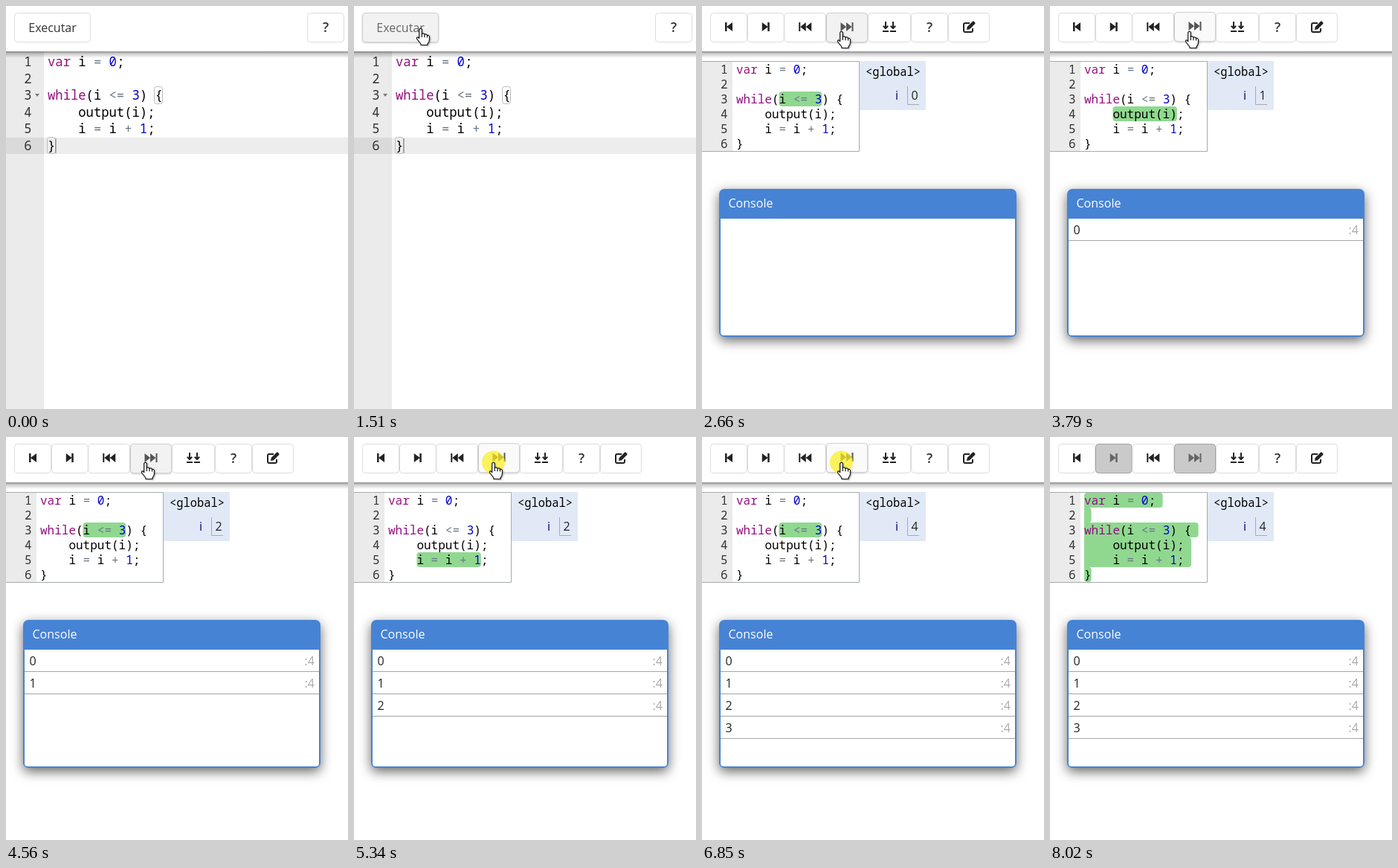
Animation of 460x542 px, one loop 8410 ms. Source, as an HTML page:

```html
<!DOCTYPE html>
<html lang="pt">
<head>
<meta charset="utf-8">
<title>Step debugger</title>
<style>
html, body { margin: 0; width: 100%; height: 100%; overflow: hidden; background: #fff; }
svg { display: block; width: 460px; height: 542px; }
text { font: 16px "Open Sans", "Noto Sans", sans-serif; fill: #222; white-space: pre; }
.big text { font: 17.2px "Noto Sans Mono", monospace; fill: #000; }
.small text { font: 16px "Noto Sans Mono", monospace; fill: #000; }
.big .num, .small .num { fill: #333; text-anchor: end; }
.kw { fill: #930f80; }
.lit { fill: #0000cd; }
.op { fill: #687687; }
.btn rect { fill: #fff; stroke: #dcdcdc; }
.btn text { fill: #333; font-weight: 500; text-anchor: middle; }
.btn path { fill: #222; }
.btn path.line { fill: none; stroke: #222; stroke-width: 2; }
.btn.hover rect { fill: #f2f2f2; stroke: #cfcfcf; filter: drop-shadow(0 1px 1px rgba(0,0,0,.2)); }
.btn.press rect { fill: #fafafa; }
.btn.hover path { fill: #555; }
.btn.hover path.line { fill: none; stroke: #555; }
.btn.hover text { fill: #666; }
.btn.off rect { fill: #cacaca; stroke: #a2a2a2; }
.btn.off path { fill: #666; }
#marks rect { fill: #90d890; }
#console { filter: drop-shadow(0 5px 8px rgba(0,0,0,.6)); }
#pointer path { fill: #fff; stroke: #111; stroke-width: 1.2; stroke-linejoin: round; }
#pointer { filter: drop-shadow(1px 1px 1px rgba(0,0,0,.3)); }
#pointer .bare { fill: none; }
.head { fill: #fff; }
.row line { stroke: #a3a5ab; }
.row .at { fill: #a9a9a9; text-anchor: end; }
</style>
</head>
<body>
<svg viewBox="0 0 460 542">
  <defs>
    <linearGradient id="fade" x2="0" y2="1">
      <stop offset="0" stop-color="#000" stop-opacity=".45"/>
      <stop offset=".35" stop-color="#000" stop-opacity=".2"/>
      <stop offset="1" stop-color="#000" stop-opacity="0"/>
    </linearGradient>
  </defs>
  <rect width="460" height="542" fill="#fff"/>

  <g id="editView">
    <rect y="61" width="51" height="481" fill="#ebebeb"/>
    <rect y="177" width="51" height="22" fill="#dadada"/>
    <rect x="51" y="177" width="409" height="22" fill="#ededed"/>
    <path d="M39 118h6l-3 4z" fill="#777"/>
    <g fill="none" stroke="#bcbcbc">
      <rect x="199.5" y="108.500" width="11" height="23" rx="3"/>
      <rect x="55.500" y="176.500" width="11" height="22" rx="3"/>
    </g>
    <g class="big" id="bigCode"></g>
    <path id="caret" d="M67 178v20" stroke="#777"/>
  </g>

  <g id="debugView">
    <rect y="74" width="41" height="121" fill="#ebebeb"/>
    <g id="marks"></g>
    <g class="small" id="smallCode"></g>
    <path d="M0 74.500H211.500V195.500H0" fill="none" stroke="#a5abab"/>
    <rect x="212" y="74" width="89" height="66" fill="#e1e9f7"/>
    <g class="small"><text x="220" y="94" style="font-size:15.4px">&lt;global&gt;</text></g>
    <text x="260" y="126" style="fill:#000070">i</text>
    <path d="M276.500 108V132.500H292" fill="none" stroke="#aaa"/>
    <text id="value" x="281.500" y="126"></text>
    <g id="console">
      <rect x="23" y="246" width="400" height="199" rx="7" fill="#4783d4"/>
      <path d="M25 286H421V439q0 4-4 4H29q-4 0-4-4z" fill="#fff"/>
    </g>
    <text class="head" x="35.500" y="271" style="fill:#fff">Console</text>
    <g id="rows"></g>
  </g>

  <rect width="460" height="61" fill="#fff"/>
  <rect y="61" width="460" height="9" fill="url(#fade)"/>
  <g id="editBar"></g>
  <g id="debugBar"></g>

  <circle id="glow" r="15.500" fill="#fbee1e" fill-opacity=".72"/>
  <g id="pointer">
    <g id="hand">
      <path d="M-1.800 1.600Q0-1.200 1.800 1.600V7.200Q4.200 6.200 5.400 8.200 7.800 7.200 9 9.400 11.600 8.800 12 11.500V15Q12 18 9.500 21V22.500H.5V21Q-1.500 18.500-5 14-5.200 11.500-3.500 11.800L-1.800 13.500Z"/>
      <path class="bare" d="M1.800 7v5M5.400 8.200v4M9 9.400v3"/>
    </g>
    <path id="arrow" d="M0 0V16L3.700 12.500 6.200 18.500 8.600 17.500 6.100 11.700H11.300Z"/>
    <path id="beam" class="bare" d="M-3.500-8.500h3l.5.5.5-.5h3M0-8V8M-3.500 8.500h3l.5-.5.5.5h3"/>
  </g>
</svg>
<script>
const LOOP = 8410;
const $ = id => document.getElementById(id);
const show = (el, on) => { el.style.display = on ? "" : "none"; };
const clamp = v => Math.max(0, Math.min(1, v));

const code = ["var i = 0;", "", "while(i <= 3) {", "    output(i);", "    i = i + 1;", "}"];

function paint(line) {
  return line.replace(/(var|while)|(\d+)|(<=|=|\+)/g, (s, kw, lit) =>
    `<tspan class="${kw ? "kw" : lit ? "lit" : "op"}">${s.replace("<", "&lt;")}</tspan>`);
}
function listing(x, y, step) {
  return code.map((line, n) =>
    `<text class="num" x="34.5" y="${y + n * step}">${n + 1}</text>` +
    `<text x="${x}" y="${y + n * step}">${paint(line)}</text>`).join("");
}
$("bigCode").innerHTML = listing(56, 81, 22.5);
$("smallCode").innerHTML = listing(46, 91, 20);

// Toolbars
const back = "M-5-6h2.500v12h-2.500zM5-6v12l-8-6z";
const rewind = "M-8.500-6h2v12h-2zM1-6v12l-7.500-6zM8.500-6v12l-7.500-6z";
const icon = (d, flip) => `<path d="${d}" ${flip ? 'transform="scale(-1 1)"' : ""}/>`;
const stroke = d => `<path class="line" d="${d}"/>`;
const help = '<text y="7" style="font-size:18px;font-weight:600">?</text>';

function button(x0, x1, face) {
  return { x0, x1, html: `<g class="btn"><rect x="${x0 + .5}" y="9.5" width="${x1 - x0 - 1}" height="39" rx="4"/>` +
    `<g transform="translate(${(x0 + x1) / 2} 28)">${face}</g></g>` };
}
function toolbar(id, buttons) {
  $(id).innerHTML = buttons.map(b => b.html).join("");
  buttons.forEach((b, n) => { b.el = $(id).children[n]; });
  return buttons;
}
const editBar = toolbar("editBar", [
  button(11, 114, '<text y="7">Executar</text>'),
  button(405, 455, help)
]);
const edges = [11, 61, 110.5, 167, 223, 281, 331, 387];
const debugBar = toolbar("debugBar", [
  icon(back), icon(back, true), icon(rewind), icon(rewind, true),
  stroke("M-5-7V2M-8.200-1.200L-5 2 -1.800-1.200M5-7V2M1.800-1.200L5 2 8.200-1.200M-9 6h8M1 6h8"),
  help,
  stroke("M1-5H-5Q-7-5-7-3V5Q-7 7-5 7H3Q5 7 5 5V2") + icon("M-3 4l.7-4L5-7.300q1-.8 2 .2l1 1q1 1 .2 2L1 3.300z")
].map((face, n) => button(edges[n], edges[n + 1], face)));

// Program run: one entry per executed step
const runClick = 1660;
const stepClicks = [2500, 2800, 3040, 3440, 3750, 4050, 4340, 4720, 5090, 5420, 5850, 6250, 6560, 6900];
const clicks = [runClick, ...stepClicks];
const HOLD = 120;
const last = stepClicks.length;

const mark = (line, from, to) =>
  `<rect x="${46 + from * 9.6}" y="${75 + line * 20}" width="${(to - from) * 9.6}" height="20" rx="4"/>`;
const wholeProgram = code.map((s, n) => mark(n, 0, s.length + (n < 5 ? 1 : 0))).join("") +
  '<rect x="46" y="80" width="8" height="110"/><rect x="180" y="150" width="10" height="20"/>';
const loopMarks = [mark(2, 6, 12), mark(3, 4, 13), mark(4, 4, 13)];

function marksAt(step) {
  if (step === 0) return mark(0, 0, 10);
  return step === last ? wholeProgram : loopMarks[(step - 1) % 3];
}
const valueAt = step => step ? Math.min(4, Math.floor((step - 1) / 3)) : "";
function rowsAt(step) {
  let html = "";
  for (let n = 0; n < Math.min(4, Math.floor(step / 3)); n++) {
    const y = 286 + n * 30;
    html += `<g class="row"><text x="31.5" y="${y + 21}">${n}</text>` +
      `<text class="at" x="415" y="${y + 21}">:4</text>` +
      `<line x1="25" x2="421" y1="${y + 29.5}" y2="${y + 29.5}"/></g>`;
  }
  return html;
}

// Pointer legs: start, end, from, to, easing
const runAt = [89.5, 30], stepAt = [187.5, 34];
const smooth = k => k * k * (3 - 2 * k);
const legs = [
  [670, 1410, [431, 526], runAt, smooth],
  [1760, 2270, runAt, stepAt, smooth],
  [7690, 8020, stepAt, [418, 546], k => k * (.4 + .6 * k)]
];
function pointerAt(t) {
  if (t < 670 || t >= 8020) return null;
  const [t0, t1, a, b, ease] = legs.filter(leg => t >= leg[0]).pop();
  const k = ease(clamp((t - t0) / (t1 - t0)));
  return a.map((v, n) => v + (b[n] - v) * k);
}

function liftAt(t) {
  return Math.max(...clicks.map(c =>
    t < c ? clamp((t - c + HOLD) / 60) : clamp(1 - (t - c - 30) / 90)));
}

let drawn = -1;
function drawStep(step) {
  if (step === drawn) return;
  drawn = step;
  $("marks").innerHTML = marksAt(step);
  $("value").textContent = valueAt(step);
  $("rows").innerHTML = rowsAt(step);
}

function render(t) {
  const debug = t >= runClick + 30;
  const step = stepClicks.filter(c => t >= c).length;
  const pos = pointerAt(t);
  const lift = liftAt(t);
  show($("editView"), !debug);
  show($("editBar"), !debug);
  show($("debugView"), debug);
  show($("debugBar"), debug);
  show($("caret"), t < 270 || t >= 770);
  drawStep(step);

  let over = false;
  (debug ? debugBar : editBar).forEach((b, n) => {
    const hit = pos && pos[0] >= b.x0 && pos[0] < b.x1 && pos[1] > 9 && pos[1] < 48;
    const off = debug && (n % 2 ? n < 4 && step === last : n < 3 && step === 0);
    const up = hit && !off ? lift : 0;
    over = over || hit;
    b.el.setAttribute("class", "btn" + (off ? " off" : hit ? " hover" : "") + (up > .5 ? " press" : ""));
    b.el.setAttribute("transform", `translate(0 ${-up})`);
  });

  show($("pointer"), pos);
  const pressed = pos && clicks.some(c => t >= c - HOLD && t < c);
  show($("glow"), pressed);
  if (!pos) return;
  const place = `translate(${pos[0]} ${pos[1]})`;
  $("pointer").setAttribute("transform", place);
  $("glow").setAttribute("transform", place);
  const beam = !debug && pos[1] > 62 && pos[0] > 51;
  show($("hand"), over);
  show($("beam"), beam);
  show($("arrow"), !over && !beam);
}

const begin = performance.now();
function tick() {
  render((performance.now() - begin) % LOOP);
  requestAnimationFrame(tick);
}
tick();
</script>
</body>
</html>
```
